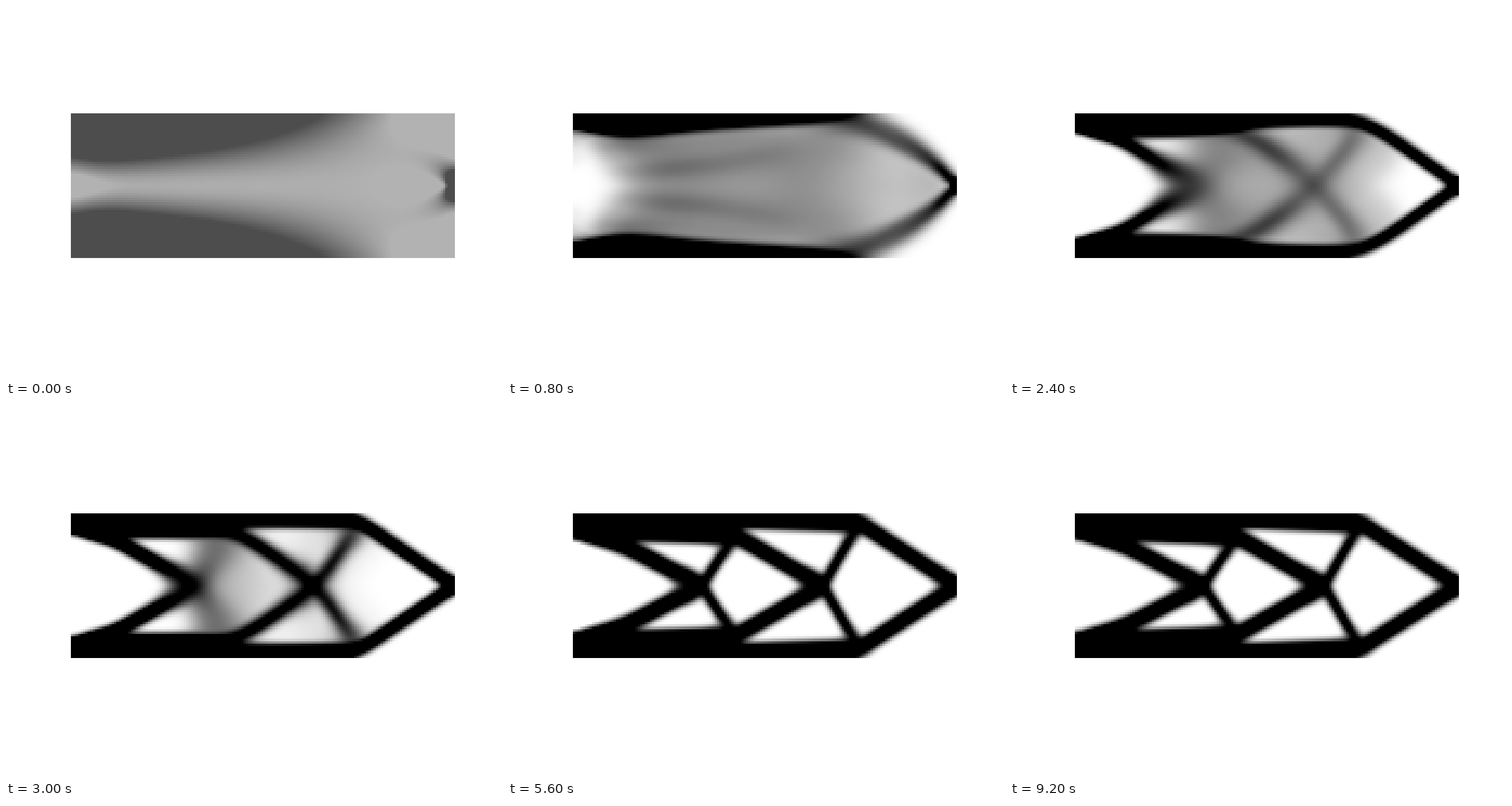
Write an HTML page with a canvas that moves like this. It is 864 px wide and 648 px high and loops after 9400 ms.

```html
<!DOCTYPE html>
<html lang="en">
<head>
<meta charset="utf-8">
<title>Cantilever topology optimisation</title>
<style>
  html, body { margin: 0; width: 100%; height: 100%; overflow: hidden; background: #fff; }
  canvas { position: absolute; left: 113px; top: 187px; width: 669px; height: 252px; image-rendering: pixelated; }
</style>
</head>
<body>
<canvas id="view" width="160" height="60"></canvas>
<script>
// SIMP optimisation of a cantilever: left edge clamped, vertical load at the
// middle of the right edge. Only the upper half is solved, by symmetry.
const COLS = 160, ROWS = 30, VOLUME = 0.5, PENAL = 3, RADIUS = 3, MOVE = 0.2;
const E_MIN = 1e-9, NU = 0.3;
const STEP = 200, LOOP = 9400, LATE_STEPS = [24, 26, 28, 31, 35, 40, 46];

const COUNT = COLS * ROWS;
const DOFS = 2 * (COLS + 1) * (ROWS + 1);
const BAND = 2 * (ROWS + 2) + 1;
const at = (row, col) => (row + 1) * BAND + col; // banded lower triangle

// Stiffness of a square bilinear element in plane stress
const k = [1/2 - NU/6, 1/8 + NU/8, -1/4 - NU/12, -1/8 + 3*NU/8,
           -1/4 + NU/12, -1/8 - NU/8, NU/6, 1/8 - 3*NU/8];
const KE = ['01234567', '10765432', '27056341', '36507214',
            '45670123', '54321076', '63412705', '72143650']
  .map(line => [...line].map(i => k[i] / (1 - NU * NU)));

const elementDofs = [];
for (let c = 0; c < COLS; c++) {
  for (let r = 0; r < ROWS; r++) {
    const left = c * (ROWS + 1) + r, right = left + ROWS + 1;
    elementDofs.push([left, right, right + 1, left + 1].flatMap(n => [2 * n, 2 * n + 1]));
  }
}

const fixed = [];
for (let d = 0; d < 2 * (ROWS + 1); d++) fixed.push(d);
for (let c = 1; c <= COLS; c++) fixed.push(2 * (c * (ROWS + 1) + ROWS));

const matrix = new Float64Array(DOFS * (BAND + 1));

function displacements(x) {
  const A = matrix.fill(0);
  elementDofs.forEach((dofs, e) => {
    const stiffness = E_MIN + x[e] ** PENAL * (1 - E_MIN);
    for (let i = 0; i < 8; i++) {
      for (let j = 0; j < 8; j++) {
        if (dofs[j] <= dofs[i]) A[at(dofs[i], dofs[j])] += stiffness * KE[i][j];
      }
    }
  });
  for (const d of fixed) A[at(d, d)] = 1e12;

  // Cholesky factorisation together with forward substitution
  const u = new Float64Array(DOFS);
  u[DOFS - 1] = 0.5;
  for (let r = 0; r < DOFS; r++) {
    const first = Math.max(0, r - BAND), rowBase = at(r, 0);
    for (let c = first; c <= r; c++) {
      const colBase = at(c, 0);
      let sum = A[rowBase + c];
      for (let m = first; m < c; m++) sum -= A[rowBase + m] * A[colBase + m];
      A[rowBase + c] = c < r ? sum / A[colBase + c] : Math.sqrt(sum);
    }
    for (let m = first; m < r; m++) u[r] -= A[rowBase + m] * u[m];
    u[r] /= A[rowBase + r];
  }
  for (let r = DOFS - 1; r >= 0; r--) {
    u[r] /= A[at(r, r)];
    for (let m = Math.max(0, r - BAND); m < r; m++) u[m] -= A[at(r, m)] * u[r];
  }
  return u;
}

function smooth(values) {
  const result = new Float64Array(COUNT), reach = Math.ceil(RADIUS) - 1;
  for (let c = 0; c < COLS; c++) {
    for (let r = 0; r < ROWS; r++) {
      let sum = 0, total = 0;
      for (let i = Math.max(0, c - reach); i <= Math.min(COLS - 1, c + reach); i++) {
        for (let j = Math.max(0, r - reach); j <= r + reach; j++) {
          const weight = Math.max(0, RADIUS - Math.hypot(i - c, j - r));
          const mirrored = j < ROWS ? j : 2 * ROWS - 1 - j;
          sum += weight * values[i * ROWS + mirrored];
          total += weight;
        }
      }
      result[c * ROWS + r] = sum / total;
    }
  }
  return result;
}

function improve(x) {
  const u = displacements(x);
  const weighted = x.map((density, e) => {
    const dofs = elementDofs[e];
    let energy = 0;
    for (let i = 0; i < 8; i++) {
      for (let j = 0; j < 8; j++) energy += u[dofs[i]] * KE[i][j] * u[dofs[j]];
    }
    return density * PENAL * (1 - E_MIN) * density ** (PENAL - 1) * energy;
  });
  const gain = smooth(weighted).map((value, e) => value / Math.max(1e-3, x[e]));

  // Bisect the multiplier that keeps the volume constant
  let low = 0, high = 1e9, next;
  while ((high - low) / (high + low) > 1e-3) {
    const middle = (low + high) / 2;
    next = x.map((density, e) => Math.max(0, density - MOVE,
      Math.min(1, density + MOVE, density * Math.sqrt(gain[e] / middle))));
    const volume = next.reduce((a, b) => a + b, 0);
    if (volume > VOLUME * COUNT) low = middle; else high = middle;
  }
  return next;
}

const designs = [improve(new Float64Array(COUNT).fill(VOLUME))];
const context = document.getElementById('view').getContext('2d');
const image = context.createImageData(COLS, 2 * ROWS);
let shown = -1;

function paint(x) {
  for (let r = 0; r < 2 * ROWS; r++) {
    for (let c = 0; c < COLS; c++) {
      const row = Math.min(r, 2 * ROWS - 1 - r);
      const grey = 255 * (1 - x[c * ROWS + row]);
      image.data.set([grey, grey, grey, 255], 4 * (r * COLS + c));
    }
  }
  context.putImageData(image, 0, 0);
}

function frame() {
  let step = Math.floor(performance.now() % LOOP / STEP);
  if (step > LATE_STEPS[0]) step = LATE_STEPS.filter(s => s <= step).pop();
  while (designs.length <= step) designs.push(improve(designs[designs.length - 1]));
  if (step !== shown) paint(designs[shown = step]);
  requestAnimationFrame(frame);
}
frame();
</script>
</body>
</html>
```
